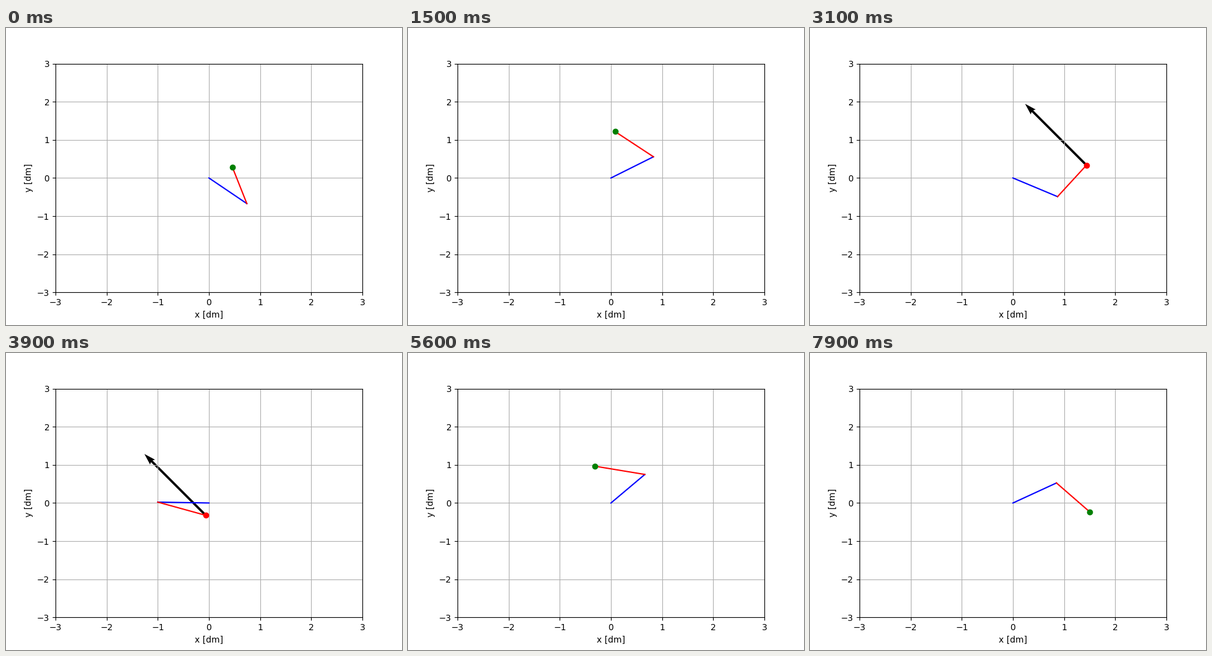
Recreate the animation shown at these times as a matplotlib script. Size 640 by 480 pixels, loop 8000 ms.

```python
import numpy as np
import matplotlib.pyplot as plt
from matplotlib.animation import FuncAnimation

FRAMES = 80
INTERVAL = 100  # ms

# Key poses: time step, shoulder angle, elbow angle (degrees, elbow relative)
POSES = np.array([
    (0, -42.2, 148.7),
    (15, 33.8, 104.8),
    (24, 166, 68.5),
    (31, 330.7, 84.9),
    (39, 538.7, 161),
    (45, 673.5, 262.1),
    (56, 768.5, 479),
    (67, 638.7, 624),
    (79, 391.7, 638.9),
])
START_SPEED = (0, 0)
END_SPEED = (-20.8, -3.5)

PUSH = range(24, 44)   # external force acts on the hand
ALERT = range(62, 73)  # hand is red without a force


def smooth_path(t, y, v_start, v_end, x):
    """Clamped cubic spline through (t, y), evaluated at x."""
    h = np.diff(t)[:, None]
    rate = np.diff(y, axis=0) / h
    n = len(t)
    A = np.eye(n)
    b = np.zeros_like(y)
    b[0], b[-1] = v_start, v_end
    for i in range(1, n - 1):
        before, after = h[i - 1, 0], h[i, 0]
        A[i, i - 1:i + 2] = after, 2 * (before + after), before
        b[i] = 3 * (after * rate[i - 1] + before * rate[i])
    v = np.linalg.solve(A, b)

    k = np.clip(np.searchsorted(t, x, side="right") - 1, 0, n - 2)
    s = (x - t[k])[:, None] / h[k]
    return ((1 + 2 * s) * (1 - s) ** 2 * y[k] + s * (1 - s) ** 2 * h[k] * v[k]
            + s ** 2 * (3 - 2 * s) * y[k + 1] + s ** 2 * (s - 1) * h[k] * v[k + 1])


def unit(angle):
    return np.column_stack([np.cos(angle), np.sin(angle)])


angles = smooth_path(POSES[:, 0], POSES[:, 1:], START_SPEED, END_SPEED,
                     np.arange(FRAMES))
shoulder, elbow = np.radians(angles).T
joint = unit(shoulder)
tip = joint + unit(shoulder + elbow)

fig, ax = plt.subplots(figsize=(6.4, 4.8), dpi=100)
ax.set(xlim=(-3, 3), ylim=(-3, 3), xlabel="x [dm]", ylabel="y [dm]")
ax.grid(True)

force = ax.quiver([0], [0], [-1], [1], scale=5)
upper, = ax.plot([], [], "b")
lower, = ax.plot([], [], "r")
hand, = ax.plot([], [], "go")


def update(i):
    (jx, jy), (tx, ty) = joint[i], tip[i]
    upper.set_data([0, jx], [0, jy])
    lower.set_data([jx, tx], [jy, ty])
    hand.set_data([tx], [ty])
    hand.set_color("r" if i in PUSH or i in ALERT else "g")
    force.set_offsets([tip[i]])
    force.set_visible(i in PUSH)
    return force, upper, lower, hand


anim = FuncAnimation(fig, update, frames=FRAMES, interval=INTERVAL,
                     repeat=True, repeat_delay=0)
plt.show()
```
